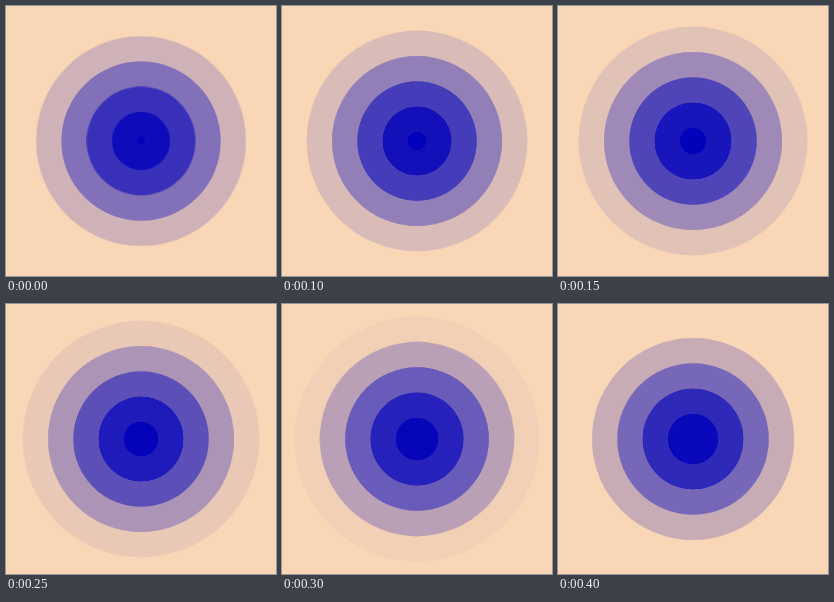
These frames come from a looping animation (270 by 270 pixels, 0.45 s). An HTML page:

```html
<!DOCTYPE html>
<html lang="en">
<head>
<meta charset="utf-8">
<title>Ripple</title>
<style>
  html, body { margin: 0; width: 100%; height: 100%; overflow: hidden; background: #f9d7b6; }
  svg { display: block; width: 100vw; height: 100vh; }
  circle { fill: #0000bb; }
</style>
</head>
<body>
<svg viewBox="-135 -135 270 270"></svg>
<script>
  const RINGS = 5;
  const GAP = 25.3;
  const REACH = RINGS * GAP;
  const STEP_MS = 50;
  // Radius of the innermost ring at each step; the others follow at a fixed gap.
  const radii = [3.8, 6.5, 9.2, 13.2, 15.2, 17.2, 21.3, 23.2, 25.2];

  const svg = document.querySelector('svg');

  function addRing(index) {
    const ring = document.createElementNS('http://www.w3.org/2000/svg', 'circle');
    ring.setAttribute('r', REACH);
    svg.append(ring);

    const pose = (radius, offset) => {
      const scale = (radius + index * GAP) / REACH;
      return { transform: `scale(${scale})`, opacity: 1 - scale, offset, easing: 'step-end' };
    };
    const frames = radii.map((radius, i) => pose(radius, i / radii.length));
    frames.push(pose(radii.at(-1), 1));
    ring.animate(frames, { duration: radii.length * STEP_MS, iterations: Infinity });
  }

  for (let i = RINGS - 1; i >= 0; i--) addRing(i);
</script>
</body>
</html>
```
